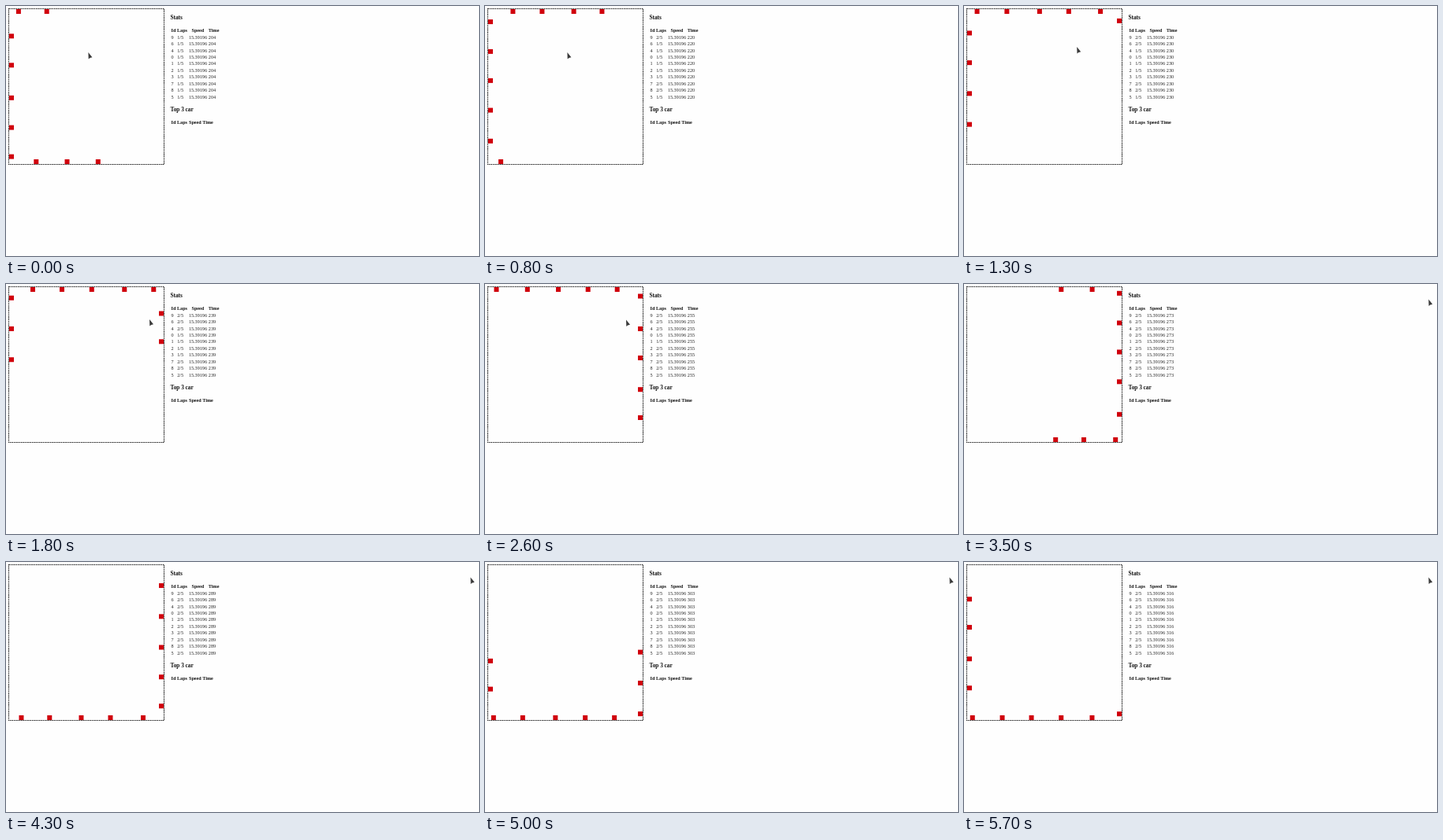
Write an HTML page with a canvas that moves like this. It is 600 px wide and 318 px high and loops after 5800 ms.

```html
<!DOCTYPE html>
<html lang="en">
<head>
<meta charset="utf-8">
<title>Car race</title>
<style>
  html, body { margin: 0; width: 100%; height: 100%; overflow: hidden; background: #fefefe; }
  canvas, svg { position: absolute; left: 0; top: 0; width: 600px; height: 318px; }
  text { font: 6.16px 'Liberation Serif', 'Times New Roman', serif; fill: #222; }
  .b { font-weight: bold; fill: #111; }
  .h { font-size: 7.25px; }
</style>
</head>
<body>
<canvas id="track" width="600" height="318"></canvas>
<svg id="panel" viewBox="0 0 600 318"></svg>
<script>
const LOOP = 5800, STEP = 100;
const SPEED = 6.045;              // pixels per tick
const LEFT = 7, TOP = 7, RIGHT = 197, BOTTOM = 198, SIZE = 6;
const W = RIGHT - LEFT, H = BOTTOM - TOP, LAP = 2 * (W + H);
const FINISH = 246;               // distance at which the second lap begins
const ORDER = [9, 6, 4, 0, 1, 2, 3, 7, 8, 5];
// starting distance of each car, by id
const START = [-109.8, -70.5, -31.3, 6.4, 43.4, 81.2, 122.7, 159.7, 199.9, 235.7];
// pointer path: time, x, y
const POINTER = [[0, 104.4, 59], [1000, 104.4, 59], [1600, 182, 45],
                 [2300, 182, 45], [2500, 179, 45.5], [2600, 179, 45.5], [3000, 589.3, 19.5]];

const g = document.getElementById('track').getContext('2d');
const panel = document.getElementById('panel');

function label(x, y, str, cls = '') {
  const el = document.createElementNS('http://www.w3.org/2000/svg', 'text');
  el.setAttribute('x', x);
  el.setAttribute('y', y);
  el.setAttribute('class', cls);
  el.textContent = str;
  panel.appendChild(el);
  return el;
}

function header(y, xs) {
  ['Id', 'Laps', 'Speed', 'Time'].forEach((s, i) => label(xs[i], y, s, 'b'));
}

label(208.5, 16.9, 'Stats', 'b h');
header(33, [209.5, 217, 235.5, 256.8]);
const rows = ORDER.map((id, i) => {
  const y = 41.6 + i * 8.47;
  label(209.5, y, id);
  const laps = label(217.2, y, '');
  label(231.9, y, '15.39196');
  return { id, laps, time: label(256.8, y, '') };
});
label(208.5, 133.9, 'Top 3 car', 'b h');
header(150.2, [209.5, 217, 232, 249.2]);

// Clockwise position, measured from the bottom left corner
function place(s) {
  s = (s % LAP + LAP) % LAP;
  if (s < H) return [LEFT, BOTTOM - s];
  s -= H;
  if (s < W) return [LEFT + s, TOP];
  s -= W;
  if (s < H) return [RIGHT, TOP + s];
  return [RIGHT - (s - H), BOTTOM];
}

function pointerAt(t) {
  const i = POINTER.findIndex(p => p[0] > t);
  if (i < 0) return POINTER[POINTER.length - 1].slice(1);
  const [t0, x0, y0] = POINTER[i - 1], [t1, x1, y1] = POINTER[i];
  const u = (t - t0) / (t1 - t0), k = u * u * (3 - 2 * u);
  return [x0 + (x1 - x0) * k, y0 + (y1 - y0) * k];
}

function drawPointer(x, y) {
  g.fillStyle = '#3a3a3a';
  g.beginPath();
  [[0, 0], [0.3, 8.6], [2.1, 7], [5, 6.3]].forEach(([dx, dy]) => g.lineTo(x + dx, y + dy));
  g.fill();
}

function draw(t) {
  const tick = Math.floor(204.5 + t * 0.0197);
  const run = (tick - 204) * SPEED;

  g.clearRect(0, 0, 600, 318);
  g.strokeStyle = '#111';
  g.lineWidth = 1.1;
  g.setLineDash([1.4, 0.9]);
  g.strokeRect(3.5, 3.5, 197, 198);

  g.fillStyle = '#d0000c';
  for (const s of START) {
    const [x, y] = place(s + run);
    g.fillRect(x - SIZE / 2, y - SIZE / 2, SIZE, SIZE);
  }
  drawPointer(...pointerAt(t));

  for (const r of rows) {
    r.laps.textContent = (START[r.id] + run >= FINISH ? 2 : 1) + '/5';
    r.time.textContent = tick;
  }
}

const begin = performance.now();
function loop() {
  const t = (performance.now() - begin) % LOOP;
  draw(Math.floor(t / STEP) * STEP);
  requestAnimationFrame(loop);
}
loop();
</script>
</body>
</html>
```
